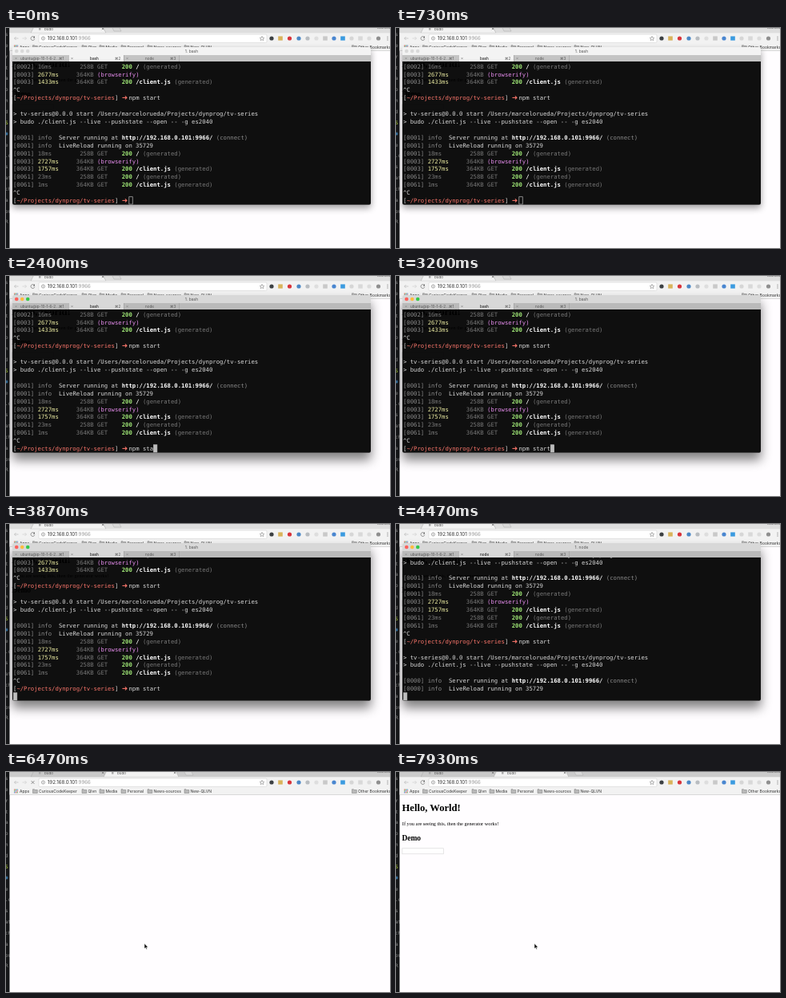
Animation of 480 by 276 pixels, one loop 8000 ms. Source, as an HTML page:

```html
<!DOCTYPE html>
<html lang="en">
<head>
<meta charset="utf-8">
<title>Starting a dev server</title>
<style>
  html, body { margin: 0; width: 100%; height: 100%; overflow: hidden; background: #fff; }
  svg { display: block; width: 480px; height: 276px; }
  text { white-space: pre; }
  .ui { font-family: Inter, "Open Sans", sans-serif; font-size: 5px; fill: #333; }
  .url { font-size: 6.2px; }
  .tab { font-size: 4.6px; fill: #555; }
  .current { fill: #222; font-weight: 500; }
  .page { font-family: "Liberation Serif", "Noto Serif", serif; font-size: 6.3px; fill: #000; }
  .mono { font-family: "DejaVu Sans Mono", "Noto Sans Mono", monospace; font-size: 7.27px; fill: #d8d8d8; }
  .dim { fill: #8a8a8a; }
  .faint { fill: #787878; }
  .slow { fill: #eeeea4; }
  .ok { fill: #a2ea78; font-weight: bold; }
  .bold { fill: #fff; font-weight: bold; }
  .pink { fill: #e58cec; }
  .red { fill: #f8756a; }
  .arrow { fill: #f8756a; font-family: "DejaVu Sans", sans-serif; font-size: 8.8px; }
</style>
</head>
<body>
<svg id="stage" viewBox="0 0 480 276" xmlns="http://www.w3.org/2000/svg"></svg>
<script>
const LOOP = 8000;
const CELL = 4.377, ROW = 9.91, LEFT = 9, BASE = 50.6;
const FOCUS = 1000, ENTER = 3470, SCRIPT = 4000, SERVER = 4330, BLUR = 4800, BROWSER = 4870, TITLE = 5070, LOADED = 6800;
const KEYS = [1870, 1930, 2060, 2130, 2200, 2270, 2330, 2530, 2600];
const COMMAND = "npm start";

const rect = (x, y, w, h, fill, more = "") => `<rect x="${x}" y="${y}" width="${w}" height="${h}" fill="${fill}" ${more}/>`;
const dot = (x, y, r, fill, more = "") => `<circle cx="${x}" cy="${y}" r="${r}" fill="${fill}" ${more}/>`;
const stroke = (d, color, width = .7) => `<path d="${d}" fill="none" stroke="${color}" stroke-width="${width}"/>`;
const label = (x, y, s, cls = "ui", more = "") => `<text x="${x}" y="${y}" class="${cls}" ${more}>${s}</text>`;
const cross = (x, y, r, color) => stroke(`M${x - r} ${y - r}l${2 * r} ${2 * r}m0 ${-2 * r}l${-2 * r} ${2 * r}`, color);
const folder = x => `<path d="M${x} 21.7h2l.6.8h3.2v4h-5.8z" fill="#b9b9b9" stroke="#777" stroke-width=".5"/>`;

// Terminal lines are lists of [column, text, class, id].
const request = (stamp, ms, size, path, cls = "faint") => [
  [0, `[${stamp}]`, "dim"], [7, ms, cls], [23 - size.length, size, "faint"],
  ...(path
    ? [[24, "GET", "faint"], [31, "200", "ok"], [35, path, "bold"], [36 + path.length, "(generated)", "faint"]]
    : [[24, "(browserify)", "pink"]])
];
const prompt = (command, id = "") => [
  [0, "["], [1, "~/Projects/dynprog/tv-series", "red"], [29, "]"], [31, "➜", "arrow"], [33, command, "", id]
];
const script = [
  [[0, "&gt; tv-series@0.0.0 start /Users/marcelorueda/Projects/dynprog/tv-series"]],
  [[0, "&gt; budo ./client.js --live --pushstate --open -- -g es2040"]]
];
const server = stamp => [
  [[0, `[${stamp}]`, "dim"], [7, "info", "dim"], [13, "Server running at"], [31, "http://192.168.0.101:9966/", "bold"], [58, "(connect)", "dim"]],
  [[0, `[${stamp}]`, "dim"], [7, "info", "dim"], [13, "LiveReload running on 35729"]]
];
const lines = [
  request("0002", "16ms", "258B", "/"),
  request("0003", "2677ms", "364KB", "", "slow"),
  request("0003", "1433ms", "364KB", "/client.js", "slow"),
  [[0, "^C"]],
  prompt(COMMAND),
  [], ...script, [], ...server("0001"),
  request("0001", "18ms", "258B", "/"),
  request("0003", "2727ms", "364KB", "", "slow"),
  request("0003", "1757ms", "364KB", "/client.js", "slow"),
  request("0061", "23ms", "258B", "/"),
  request("0061", "1ms", "364KB", "/client.js"),
  [[0, "^C"]],
  prompt("", "typed"),
  [], ...script, [], ...server("0000")
];
const drawLine = (parts, row) => `<text class="mono" id="line${row}" y="${BASE + row * ROW}">` +
  parts.map(([col, s, cls = "", id = ""]) =>
    `<tspan x="${LEFT + col * CELL}" class="${cls}"${id && ` id="${id}"`}>${s}</tspan>`).join("") + "</text>";

function desktop() {
  const scraps = ["s", "e", "r", "t", "a", "o", "n", "d", "S", "#", "e", ".c", "s", "at", "ch", "a", "ps", "R"];
  const colors = { 8: "#b5d43a", 9: "#4aa3e8" };
  return rect(0, 0, 5, 276, "#151618") + scraps.map((s, i) =>
    label(-1, 10 + i * 13.85, s, "mono", `style="font-size:6px;fill:${colors[i] || "#8a8a8a"}"`)).join("");
}

function browser() {
  const chromeTab = (x, fill) => `<path d="M${x} 6.3l4-8h86l4 8z" fill="${fill}" stroke="#a5a5a5" stroke-width=".5"/>`;
  const newTab = x => `<path d="M${x} -2l3 6h9l-3-6z" fill="#d9d9d9" stroke="#aaa" stroke-width=".5"/>`;
  const icons = [[332, "#3c4043"], [343, "#d9b45b", 1], [354.5, "#d8343c"], [366, "#4b87c5"], [377, "#b9bdc1"], [388, "#dedede"],
    [399, "#c9c9c9", 1], [410, "#4a86d0"], [421, "#3b9be0", 1], [432, "#d6d6d6"], [443, "#d9d9d9", 1], [454, "#dcdcdc"], [465.5, "#8f8f8f"]];
  const bookmarks = [[33.5, "CuriousCodeKeeper"], [95, "Qlvn"], [117, "Media"], [144, "Personal"], [177, "News-sources"], [223, "New-QLVN"]];
  return rect(4.5, 0, 476, 276, "#fffdff") + rect(4.5, 0, 476, 7, "#d0d0d0", 'id="strip"') +
    `<g id="firstTab">${chromeTab(31, "#f2f2f2")}${newTab(132)}</g>` +
    `<g id="secondTab">${chromeTab(31, "#c9c9c9")}${chromeTab(122, "#f2f2f2")}${newTab(222)}` +
      label(139, 3, "Untitled", "ui tab", 'id="tabTitle"') + rect(132, 0, 2.5, 2.6, "#aaa") + cross(211, 1, 1.2, "#777") + "</g>" +
    label(48, 3, "budo", "ui tab") + rect(41, 0, 2.5, 2.6, "#aaa") + cross(121, 1, 1.2, "#777") +
    label(464, 1.4, "Marcelo", "ui tab") +
    rect(4.5, 6.3, 476, 22, "#f2f2f2") + rect(4.5, 28, 476, .6, "#c4c4c4") +
    stroke("M15.5 13h-5m2-2l-2 2 2 2", "#b9b9b9") + stroke("M20.5 13h5m-2-2l2 2-2 2", "#cfcfcf") +
    `<g id="reload">${stroke("M35.4 11.6a2.4 2.4 0 1 0 .4 2", "#666")}<path d="M36 10v2.4h-2.4z" fill="#666"/></g>` +
    `<g id="stop">${cross(33.5, 13, 1.9, "#666")}</g>` +
    rect(41, 8, 285, 10.4, "#fff", 'rx="1.2" stroke="#c9c9c9" stroke-width=".5"') +
    dot(46.5, 13, 2.1, "none", 'stroke="#777" stroke-width=".6"') + stroke("M46.5 12.6v1.5m0-2.5v.6", "#777", .6) +
    label(51.8, 15.2, '192.168.0.101<tspan fill="#999">:9966</tspan>', "ui url") +
    '<path d="M320 10.4l.8 1.8 1.9.2-1.4 1.3.4 1.9-1.7-1-1.7 1 .4-1.9-1.4-1.3 1.9-.2z" fill="none" stroke="#666" stroke-width=".5"/>' +
    icons.map(([x, fill, square]) => square ? rect(x - 2.8, 10.4, 5.6, 5.2, fill) : dot(x, 13, 2.6, fill)).join("") +
    [11, 13, 15].map(y => dot(477, y, .6, "#666")).join("") +
    [0, 1, 2].map(i => [0, 1, 2].map(j =>
      rect(10 + i * 1.8, 21.5 + j * 1.8, 1.3, 1.3, ["#d9685c", "#65a765", "#6087cf"][(i + j) % 3])).join("")).join("") +
    label(17, 25.8, "Apps") +
    bookmarks.map(([x, s]) => folder(x) + label(x + 7.5, 25.8, s)).join("") +
    folder(432.5) + label(440, 25.8, "Other Bookmarks") +
    '<g id="content">' +
    label(7.5, 49.3, "Hello, World!", "page", 'style="font-size:12.6px;font-weight:bold"') +
    label(7.8, 67.2, "If you are seeing this, then the generator works!", "page") +
    label(7.5, 85.6, "Demo", "page", 'style="font-size:9.45px;font-weight:bold"') +
    rect(7.8, 95.8, 51.5, 7, "#fff", 'stroke="#dadada" stroke-width=".7"') + "</g>";
}

function terminal() {
  const frame = more => `<rect x="8" y="24" width="448" height="197.8" rx="2" ${more}/>`;
  const blur = (id, size) => `<filter id="${id}" x="-20%" y="-20%" width="140%" height="150%"><feGaussianBlur stdDeviation="${size}"/></filter>`;
  const tabs = [[8, "ubuntu@ip-10-1-6-2…", 18], [78, "bash", 105], [147, "node", 174]];
  return `<mask id="outside">${rect(0, 0, 480, 276, "#fff")}${frame('fill="#000"')}</mask>` +
    blur("blurWide", 7) + blur("blurSmall", 4.5) +
    `<clipPath id="screen">${rect(8, 42, 448, 179.8, "#000")}</clipPath>` +
    '<g mask="url(#outside)">' +
    frame('id="wideShadow" transform="translate(0 9)" opacity=".5" filter="url(#blurWide)"') +
    frame('id="smallShadow" transform="translate(0 4)" opacity=".38" filter="url(#blurSmall)"') + "</g>" +
    '<path d="M8 42V26q0-2 2-2h444q2 0 2 2v16z" id="titleBar"/>' +
    ["#fc605b", "#fdbc40", "#34c84a"].map((c, i) => dot(13.2 + i * 7, 29, 2.3, c, `class="light" data-on="${c}"`)).join("") +
    label(232, 31, "1. bash", "ui", 'id="windowTitle" text-anchor="middle" style="fill:#555"') +
    rect(8, 34, 448, 8, "#bdbdbd", 'id="tabBar"') + rect(78, 34, 69, 8, "#d9d9d9", 'id="activeTab"') +
    [78, 147, 216].map(x => rect(x, 34, .5, 8, "#979797")).join("") +
    tabs.map(([x, s, tx], i) => cross(x + 4.5, 38.2, 1, "#888") +
      label(tx, 39.8, s, i === 1 ? "ui tab current" : "ui tab", `id="shell${i}"`) +
      label(x + 58, 39.8, "⌘" + (i + 1), "ui tab")).join("") +
    '<path d="M8 42h448v177.800q0 2-2 2h-444q-2 0-2-2z" fill="#000" fill-opacity=".94"/>' +
    `<g clip-path="url(#screen)"><g id="scroll">${lines.map(drawLine).join("")}` +
    rect(0, 0, CELL, 9.3, "#bdbdbd", 'id="caret" stroke="#bdbdbd" stroke-width=".7"') + "</g></g>";
}

const pointers =
  '<path id="arrow" d="M0 0v6.300l1.500-1.300 1 2.200 1-.4-1-2.200h2z" fill="#000" stroke="#fff" stroke-width=".5"/>' +
  `<g id="beam">${stroke("M-1.200-3q1.200 0 1.200 1v4q0 1-1.200 1m2.400-6q-1.200 0-1.200 1v4q0 1 1.200 1", "#bbb", .6)}</g>`;

document.getElementById("stage").innerHTML = desktop() + browser() + `<g id="terminal">${terminal()}</g>` + pointers;

const el = id => document.getElementById(id);
const show = (id, on) => el(id).setAttribute("display", on ? "inline" : "none");
const set = (id, name, value) => el(id).setAttribute(name, value);
const write = (id, s) => { if (el(id).textContent !== s) el(id).textContent = s; };
const lights = [...document.querySelectorAll(".light")];

function drawTerminal(t) {
  const focused = t >= FOCUS && t < BLUR;
  show("wideShadow", focused);
  show("smallShadow", !focused);
  for (const id of ["titleBar", "activeTab"]) set(id, "fill", focused ? "#d8d8d8" : "#f3f3f3");
  set("tabBar", "fill", focused ? "#bababa" : "#c4c4c4");
  lights.forEach(l => l.setAttribute("fill", focused ? l.dataset.on : "#d9d9d9"));
  const shell = t < SCRIPT + 70 ? "bash" : "node";
  write("windowTitle", "1. " + shell);
  write("shell1", shell);

  const typed = KEYS.filter(k => t >= k).length;
  write("typed", COMMAND.slice(0, typed));
  const lastRow = t < ENTER ? 17 : t < SCRIPT ? 18 : t < SERVER ? 22 : 24;
  lines.forEach((_, row) => show("line" + row, row <= lastRow));
  set("scroll", "transform", `translate(0 ${(17 - lastRow) * ROW})`);
  set("caret", "x", LEFT + (t < ENTER ? 33 + typed : 0) * CELL + .4);
  set("caret", "y", BASE - 7.3 + lastRow * ROW);
  set("caret", "fill-opacity", focused ? 1 : 0);
}

function drawBrowser(t) {
  const opened = t >= BROWSER, loading = opened && t < LOADED;
  show("firstTab", !opened);
  show("secondTab", opened);
  set("strip", "fill", opened ? "#cbcbcb" : "#dedede");
  write("tabTitle", t < TITLE ? "Untitled" : "budo");
  show("stop", loading);
  show("reload", !loading);
  show("content", !loading);
}

function drawPointer(t) {
  const p = Math.min(1, Math.max(0, (t - 735) / 200));
  const y = 258 - 42 * p * (2 - p);
  const visible = t >= 735 && t < KEYS[0];
  const overText = y < 222;
  show("beam", visible && overText);
  show("arrow", visible && !overText || t >= BROWSER);
  set("beam", "transform", `translate(172.500 ${y})`);
  set("arrow", "transform", `translate(173 ${t >= BROWSER ? 215.3 : y})`);
}

function frame(now) {
  const t = now % LOOP;
  show("terminal", t < BROWSER);
  drawTerminal(t);
  drawBrowser(t);
  drawPointer(t);
  requestAnimationFrame(frame);
}
frame(0);
</script>
</body>
</html>
```
